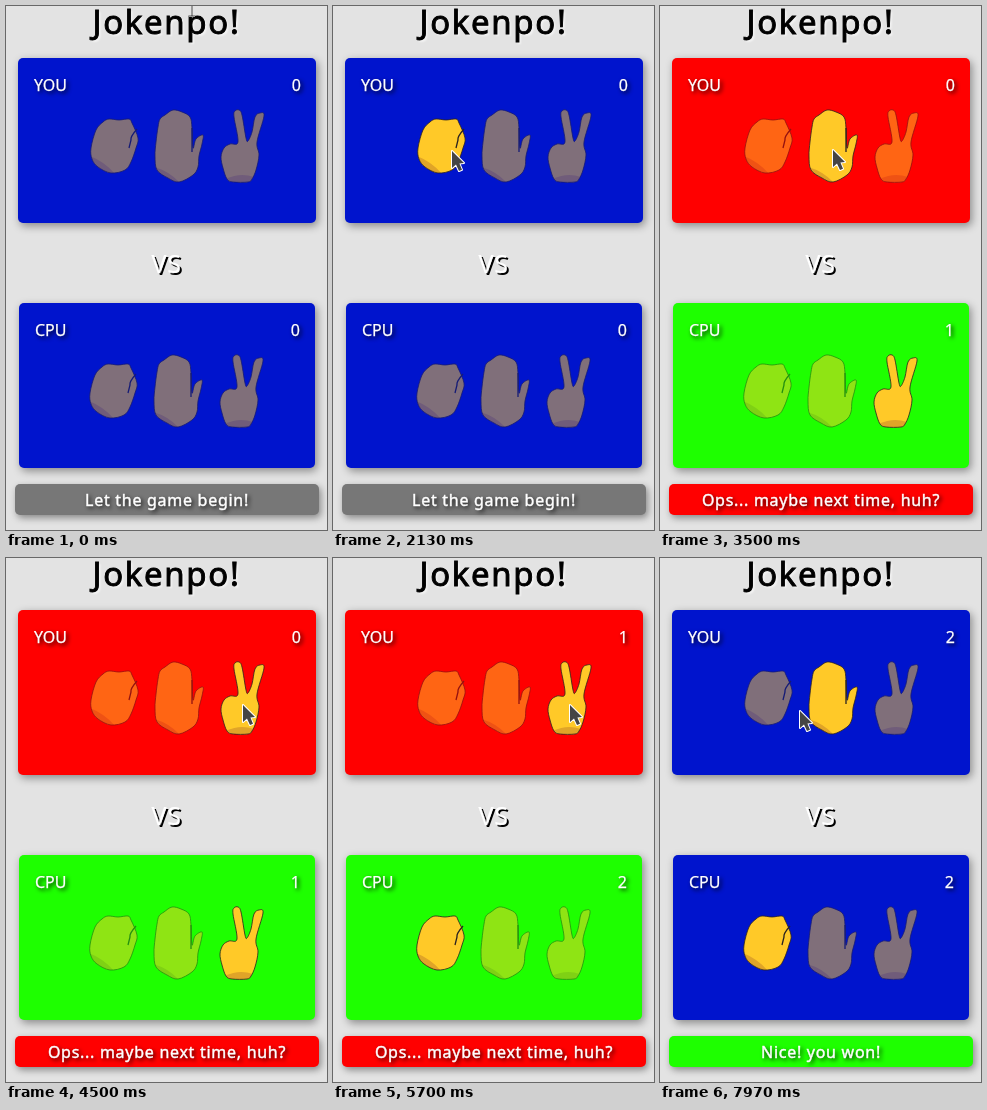
An HTML page with a canvas for the animation above (8 s loop, 321 by 524 pixels).

```html
<!DOCTYPE html>
<html lang="en">
<head>
<meta charset="utf-8">
<title>Jokenpo!</title>
<style>
html, body { margin: 0; width: 100%; height: 100%; overflow: hidden; }
body { position: relative; background: #e3e3e3; font: 16px/20px "Noto Sans", "Open Sans", sans-serif; -webkit-text-stroke: .25px; }
h1, h2, .panel, .panel span, #msg, canvas { position: absolute; margin: 0; box-sizing: border-box; }
h1, h2 { left: 0; width: 321px; text-align: center; font-weight: 400; }
h1 { top: -4px; font-size: 33px; line-height: 40px; letter-spacing: .05em; color: #000; -webkit-text-stroke: .9px; text-shadow: 2px 2px 2px rgba(255,255,255,.6); }
h2 { top: 242px; font-size: 25px; line-height: 30px; letter-spacing: .03em; color: #fff; text-shadow: 2px 2px 0 #000; }
.panel { height: 165px; border-radius: 5px; color: #fff; box-shadow: 2px 3px 8px rgba(0,0,0,.4); text-shadow: 2px 2px 4px #000; }
.panel span { top: 17px; left: 16px; }
.panel .score { left: auto; right: 15px; }
#you { left: 12px; top: 52px; width: 298px; }
#cpu { left: 13px; top: 297px; width: 296px; }
#msg { left: 9px; top: 478px; width: 304px; height: 31px; line-height: 32px; border-radius: 5px; text-align: center;
  letter-spacing: .045em; color: #fff; -webkit-text-stroke: .45px; box-shadow: 2px 3px 7px rgba(0,0,0,.4); text-shadow: 2px 2px 4px #000; }
canvas { left: 0; top: 0; }
</style>
</head>
<body>
<h1>Jokenpo!</h1>
<div class="panel" id="you"><span>YOU</span><span class="score">0</span></div>
<h2>VS</h2>
<div class="panel" id="cpu"><span>CPU</span><span class="score">0</span></div>
<div id="msg"></div>
<canvas id="stage" width="321" height="524"></canvas>
<script>
const LOOP = 8000, W = 321, H = 524;
const ROCK = 0, PAPER = 1, SCISSORS = 2, NONE = -1;
const BLUE = '#0014cd', RED = '#ff0000', GREEN = '#1eff00', YELLOW = '#e8fa00', GREY = '#777777';
const ctx = document.getElementById('stage').getContext('2d');
const you = document.getElementById('you');
const cpu = document.getElementById('cpu');
const msg = document.getElementById('msg');

// Closed smooth curve through "x,y" points
function smooth(text) {
  const p = text.split(' ').map(s => s.split(',').map(Number));
  const at = i => p[(i + p.length) % p.length];
  const path = new Path2D();
  path.moveTo(...p[0]);
  p.forEach((b, i) => {
    const a = at(i - 1), c = at(i + 1), d = at(i + 2);
    path.bezierCurveTo(b[0] + (c[0] - a[0]) / 6, b[1] + (c[1] - a[1]) / 6,
      c[0] - (d[0] - b[0]) / 6, c[1] - (d[1] - b[1]) / 6, c[0], c[1]);
  });
  return path;
}

// Each hand is rendered once so that dimming fades it as a whole
function makeHand(outline, shade, crease) {
  const sprite = document.createElement('canvas');
  sprite.width = W;
  sprite.height = 200;
  const g = sprite.getContext('2d');
  const body = smooth(outline);
  g.fillStyle = '#ffc928';
  g.fill(body);
  g.save();
  g.clip(body);
  g.fillStyle = '#e0a428';
  g.fill(new Path2D(shade));
  g.restore();
  g.strokeStyle = '#2b2320';
  g.lineWidth = 0.8;
  g.stroke(body);
  g.lineWidth = 1.3;
  g.stroke(new Path2D(crease));
  return sprite;
}

const hands = [
  makeHand('103,113 97,116 90,124 85,142 86,153 92,161 105,167 119,164 125,156 130,142 132,132 126,117 123,113 113,114',
    'M84 150 Q99 156 109 168 H84 Z', 'M131 123 Q124 131 125 134 L123 142'),
  makeHand('152,121 154,113 159,109 167,104 176,106 184,111 186,122 187,142 190,133 197,129 196,138 193,150 192,161 187,169 173,176 162,172 151,164 149,150 150,136',
    'M148 161 Q163 165 174 177 H148 Z', 'M186 122 L186 146'),
  makeHand('232,136 228,111 229,105 233,104 236,109 240,132 242,135 246,126 249,111 254,107 258,110 251,136 253,149 250,164 246,173 242,176 227,176 221,173 217,162 215,151 218,142 224,138',
    'M220 173 Q234 166 248 171 V178 H220 Z', '')
];

const pointer = new Path2D('M0 0 V17 L4 13.6 L7 20 L10 18.8 L7.4 12.6 L12 12 Z');
const beam = new Path2D('M-3 -8 H3 M0 -8 V8 M-3 8 H3');

// Rounds: time, player's hand, opponent's hand
const plays = [
  [2370, ROCK, ROCK], [3500, PAPER, SCISSORS], [4970, SCISSORS, PAPER],
  [5700, SCISSORS, ROCK], [6630, PAPER, PAPER], [7370, PAPER, ROCK]
];
const results = [
  ['What?! A tie ?!', YELLOW], ['Nice! you won!', GREEN], ['Ops... maybe next time, huh?', RED]
];

// Pointer moves: start, end, x, y
const home = [186, 2];
const moves = [
  [10, 400, 112, 146], [550, 830, 169, 147], [1380, 1400, 230, 144], [1425, 1570, 139, 146],
  [1750, 1830, 119, 145], [2800, 3130, 173, 144], [4200, 4500, 237, 147],
  [6140, 6400, 186, 151], [7770, 7830, 177, 152], [7940, 7970, 140, 153]
];

function pointerAt(t) {
  let [x, y] = home;
  for (const [from, to, tx, ty] of moves) {
    const u = Math.min(1, Math.max(0, (t - from) / (to - from)));
    const k = u * u * (3 - 2 * u);
    x += (tx - x) * k;
    y += (ty - y) * k;
  }
  return [x, y];
}

function handUnder(x, y) {
  if (y < 100) return NONE;
  return x < 138 ? ROCK : x < 205 ? PAPER : SCISSORS;
}

function gameAt(t) {
  const game = { score: [0, 0], pick: NONE, note: ['Let the game begin!', GREY] };
  for (const [time, mine, theirs] of plays) {
    if (time > t) break;
    const outcome = (mine - theirs + 3) % 3;
    if (outcome) game.score[outcome - 1]++;
    game.pick = theirs;
    game.note = results[outcome];
  }
  return game;
}

function drawHands(dx, dy, active) {
  hands.forEach((hand, i) => {
    ctx.globalAlpha = i === active ? 1 : 0.5;
    ctx.drawImage(hand, dx, dy);
  });
  ctx.globalAlpha = 1;
}

function drawPointer(x, y) {
  ctx.save();
  ctx.translate(x, y);
  ctx.lineJoin = 'round';
  ctx.strokeStyle = '#fff';
  ctx.lineWidth = 2;
  if (y < 36) {
    ctx.stroke(beam);
    ctx.strokeStyle = '#333';
    ctx.lineWidth = 1;
    ctx.stroke(beam);
  } else {
    ctx.stroke(pointer);
    ctx.fillStyle = '#454545';
    ctx.fill(pointer);
  }
  ctx.restore();
}

function setPanel(el, mine, other) {
  el.style.background = mine > other ? GREEN : mine < other ? RED : BLUE;
  el.querySelector('.score').textContent = mine;
}

function draw(t) {
  const { score: [a, b], pick, note: [text, color] } = gameAt(t);
  const [x, y] = pointerAt(t);
  setPanel(you, a, b);
  setPanel(cpu, b, a);
  msg.textContent = text;
  msg.style.background = color;
  ctx.clearRect(0, 0, W, H);
  drawHands(0, 0, handUnder(x, y));
  drawHands(-1, 245, pick);
  drawPointer(x, y);
}

const start = performance.now();
function tick() {
  draw((performance.now() - start) % LOOP);
  requestAnimationFrame(tick);
}
tick();
</script>
</body>
</html>
```
